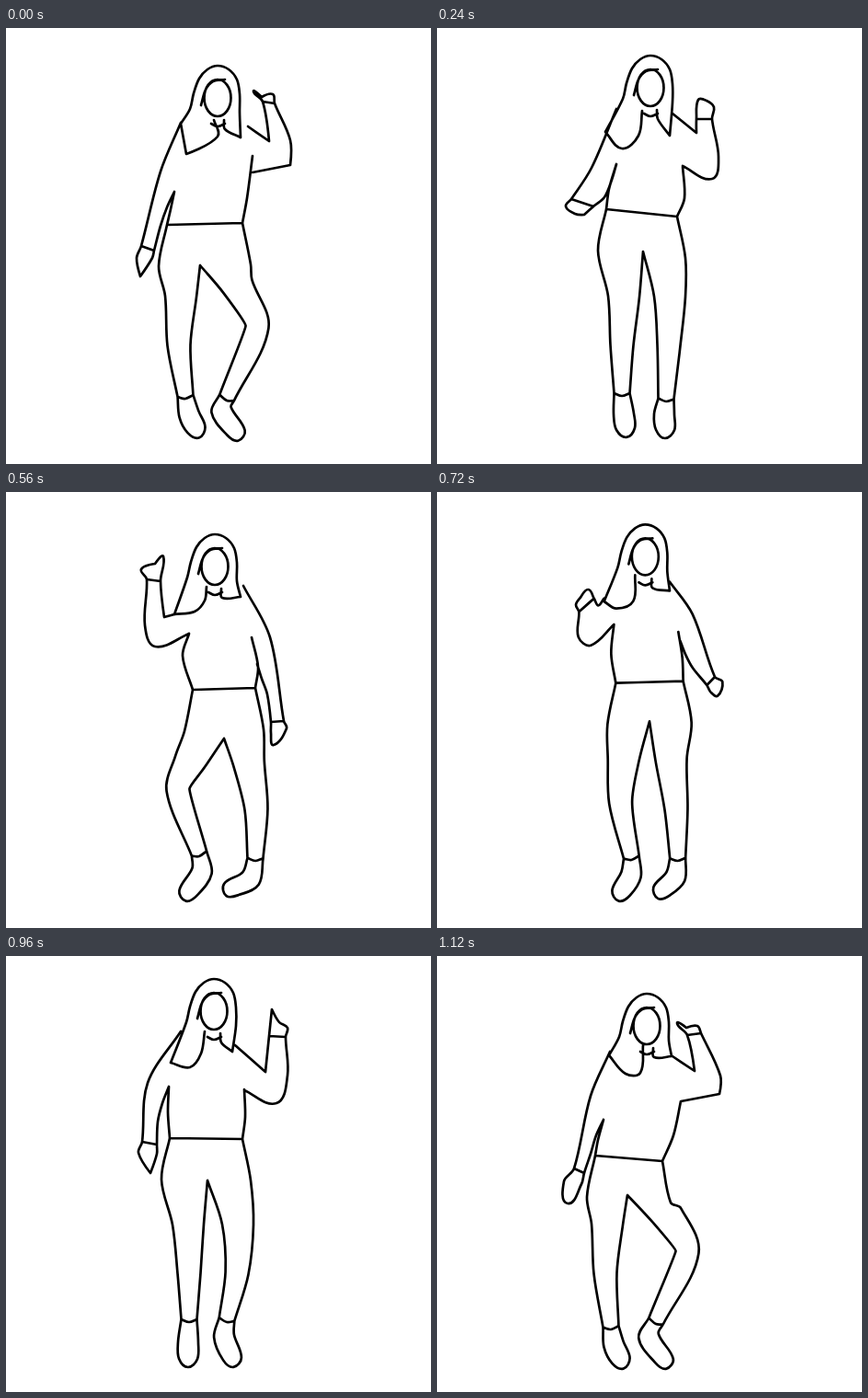
An HTML page with a canvas for the animation above (1200 ms loop, 462 px wide and 474 px high).

```html
<!DOCTYPE html>
<html lang="en">
<head>
<meta charset="utf-8">
<title>Line dance</title>
<style>
html, body { margin: 0; height: 100%; overflow: hidden; background: #fff; }
canvas { display: block; }
</style>
</head>
<body>
<canvas id="stage" width="462" height="474"></canvas>
<script>
const STEP = 80, STEPS = 15;

// Joints of each pose as x,y; * marks a sharp corner.
// face: centre            hair: left tip, three points of the left lock, right tip
// arm: shoulder, elbow, wrist, three hand points, wrist, two elbow points, armpit
// body: left side, waist left, waist right, right side, right armpit
// leg: thigh, knee, ankle, heel, toe (centres)
const poses = [
  { at: 0, face: '230,76', crotch: '211,258',
    hair: '190,104 196,137* 230,118 226,100 255,119',
    armL: '190,103 168,156 147,237 142,250 146,270* 159,250 161,242 168,215 175,195 183,178',
    armR: '263,107 286,123* 279,80 269,69 278,75* 290,72 292,82 309,122 309,149* 268,157',
    body: '179,197 175,214 257,212 262,185 268,139',
    legL: '190,292 188,345 195,400 199,420 207,437',
    legR: '252,281 273,325 240,402 234,415 250,440' },
  { at: 3, face: '232,65', crotch: '224,243',
    hair: '183,113 201,131 219,117 223,90 253,117',
    armL: '195,88 168,152 146,186 140,194 150,202 160,203* 170,194 182,184 190,165 195,148',
    armR: '256,93 282,114* 282,99 284,78 293,79 301,86 299,99 306,140 299,164 267,150',
    body: '187,175 184,197 261,205 269,185 267,150',
    legL: '203,292 201,345 201,397 203,420 205,436',
    legR: '253,292 252,345 249,403 247,420 248,437' },
  { at: 5, face: '230,66', crotch: '231,244',
    hair: '180,127 206,124 218,104 221,88 252,112',
    armL: '180,128 172,132* 169,116 164,80 160,94* 149,99 152,115 157,150 171,171 198,149',
    armR: '256,86 287,128 300,187 299,205 290,217 281,200 285,189 278,160 272,143 265,130',
    body: '194,175 193,205 270,202 271,170 265,130',
    legL: '201,290 201,345 208,396 209,414 197,436',
    legR: '251,290 258,345 260,402 256,420 248,434' },
  { at: 7, face: '227,81', crotch: '237,268',
    hair: '183,133 205,130 216,118 218,103 255,114',
    armL: '183,133 172,136* 168,97 171,70 162,78* 147,84 153,95 151,145 162,168 199,154',
    armR: '258,102 287,158 302,249 305,257 291,275 288,262 288,250 284,220 278,203 273,187',
    body: '192,178 203,215 271,213 274,190 267,158',
    legL: '200,293 187,324 210,393 213,412 198,436',
    legR: '264,295 272,345 271,398 266,420 245,432' },
  { at: 10, face: '226,65', crotch: '228,240',
    hair: '181,112 190,125 212,119 214,84 252,104',
    armL: '181,107 177,117 172,125 161,124 153,133 153,142 155,148 155,164 170,166 189,139',
    armR: '250,95 273,120 302,177 313,181 312,195 302,195 296,190 275,177 266,163 260,149',
    body: '188,175 190,204 266,202 263,175 260,149',
    legL: '204,290 206,345 212,399 210,418 201,436',
    legR: '250,290 254,345 257,398 256,417 244,435' },
  { at: 12, face: '226,60', crotch: '219,244',
    hair: '179,116 200,121 212,106 216,82 246,104',
    armL: '190,82 154,138 148,202 144,214 157,236* 164,215 164,205 165,180 170,160 177,142',
    armR: '249,97 282,126* 286,87 289,58* 297,72 306,78 304,88 306,130 294,160 259,146',
    body: '176,170 178,198 257,199 260,175 259,145',
    legL: '198,292 199,345 199,395 198,420 198,438',
    legR: '252,292 251,345 240,395 237,413 246,438' },
  { at: 14, face: '228,76', crotch: '207,260',
    hair: '187,108 205,128 221,127 224,97 255,109',
    armL: '188,104 167,152 149,231 138,245 142,269 157,248 160,236 167,215 173,195 181,178',
    armR: '256,109 280,125* 272,86 261,73 271,78* 283,76 287,84 308,130 307,150* 265,158',
    body: '175,200 172,217 245,223 257,195 265,158',
    legL: '185,292 183,345 189,403 192,422 200,440',
    legR: '250,282 272,322 238,397 230,413 247,440' }
];

// Head lines shared by all poses, measured from the face centre
const crown = '-30,12 -26,-5 -20,-21 -11,-31 0,-35 12,-31 21,-20 24,-4 24,16';
const fringe = '8,-20 -5,-18 -13,-9 -18,8';
const neck = '-7,28 0,31 8,28';
const lock = '7,24 8,34';

// A point is [x, y, smoothness]
const parse = text => text.split(' ').map(word =>
  [...word.split(',').map(parseFloat), word.endsWith('*') ? 0 : 1]);

const joints = poses.map(({ at, ...parts }) => {
  for (const name in parts) parts[name] = parse(parts[name]);
  return parts;
});

const ctx = document.getElementById('stage').getContext('2d');
ctx.lineWidth = 2.7;
ctx.lineCap = ctx.lineJoin = 'round';

// Unit vector from a to b
function toward(a, b) {
  const dx = b[0] - a[0], dy = b[1] - a[1], len = Math.hypot(dx, dy) || 1;
  return [dx / len, dy / len];
}

// Smooth curve through points
function curve(pts) {
  const last = pts.length - 1;
  const slope = pts.map((p, i) =>
    toward(pts[Math.max(i - 1, 0)], pts[Math.min(i + 1, last)]).map(d => d * (p[2] ?? 1) / 3));
  ctx.moveTo(pts[0][0], pts[0][1]);
  for (let i = 0; i < last; i++) {
    const [a, b, m, n] = [pts[i], pts[i + 1], slope[i], slope[i + 1]];
    const len = Math.hypot(b[0] - a[0], b[1] - a[1]);
    ctx.bezierCurveTo(a[0] + m[0] * len, a[1] + m[1] * len,
      b[0] - n[0] * len, b[1] - n[1] * len, b[0], b[1]);
  }
}

function head([[x, y]], hair) {
  const place = text => parse(text).map(p => [x + p[0], y + p[1]]);
  curve([hair[0], ...place(crown), hair[4]]);
  curve(hair.slice(0, 4));
  curve([...place(lock), hair[4]]);
  curve(place(fringe));
  curve(place(neck));
  ctx.moveTo(x + 14.5, y);
  ctx.ellipse(x, y, 14.5, 20, 0, 0, 2 * Math.PI);
}

function arm(pts) {
  curve(pts);
  curve([pts[2], pts[6]]);
}

// Outlines a leg around its centre line; side is -1 for left, 1 for right
function leg([thigh, knee, ankle, heel, toe], waist, crotch, side) {
  const down = toward(thigh, knee), shin = toward(knee, ankle), foot = toward(ankle, toe);
  const edges = (p, [dx, dy], half) => [side, -side].map(s => [p[0] + dy * half * s, p[1] - dx * half * s]);
  const [thighOut, thighIn] = edges(thigh, down, 17);
  const [kneeOut, kneeIn] = edges(knee, toward(thigh, ankle), 12.5);
  const [ankleOut, ankleIn] = edges(ankle, shin, 8.5);
  const [heelOut, heelIn] = edges(heel, foot, 11);
  const [toeOut, toeIn] = edges(toe, foot, 10);
  const hip = [waist[0] + 9 * side, waist[1] + 45];
  const tip = toe.slice(0, 2).map((v, i) => v + foot[i] * 9);

  kneeIn[2] = Math.max(0, down[0] * shin[0] + down[1] * shin[1]) ** 4;   // a bent knee creases
  curve([waist, hip, thighOut, kneeOut, ankleOut]);
  curve([crotch, thighIn, kneeIn, ankleIn]);
  curve([ankleOut, [ankle[0], ankle[1] + 3], ankleIn]);
  curve([ankleOut, heelOut, toeOut, tip, toeIn, heelIn, ankleIn]);
}

function draw(step) {
  const i = poses.findLastIndex(pose => pose.at <= step);
  const from = joints[i], to = joints[(i + 1) % poses.length];
  const end = poses[i + 1]?.at ?? STEPS;
  const u = (step - poses[i].at) / (end - poses[i].at);
  const now = {};
  for (const name in from)
    now[name] = from[name].map((p, k) => p.map((v, d) => v + (to[name][k][d] - v) * u));

  const { face, hair, armL, armR, body, crotch, legL, legR } = now;
  const [sideL, waistL, waistR, sideR, pitR] = body;
  ctx.fillStyle = '#fff';
  ctx.fillRect(0, 0, 462, 474);
  ctx.beginPath();
  head(face, hair);
  arm(armL);
  arm(armR);
  curve([armL[9], sideL, waistL]);
  curve([waistL, waistR]);
  curve([waistR, sideR, pitR]);
  leg(legL, waistL, crotch[0], -1);
  leg(legR, waistR, crotch[0], 1);
  ctx.stroke();
}

function tick() {
  draw(Math.floor(performance.now() / STEP) % STEPS);
  requestAnimationFrame(tick);
}
tick();
</script>
</body>
</html>
```
